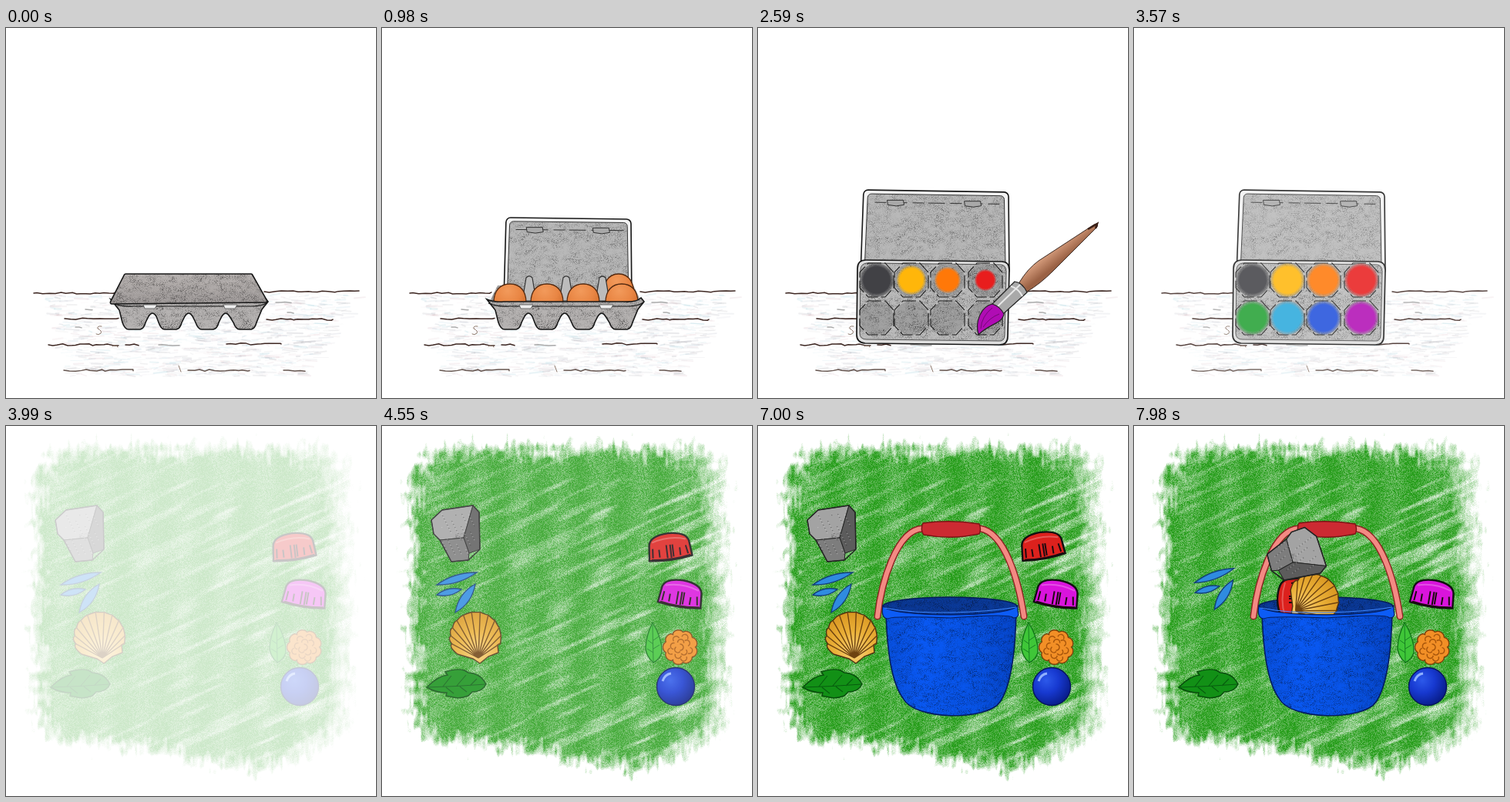
Write an HTML page with a canvas that moves like this. It is 480 by 480 pixels and loops after 8 s.

```html
<!DOCTYPE html>
<html lang="en">
<head>
<meta charset="utf-8">
<title>Eggs, paint and bucket</title>
<style>
html, body { margin: 0; width: 100%; height: 100%; overflow: hidden; background: #fff; }
canvas { display: block; width: 100vw; height: 100vh; }
</style>
</head>
<body>
<canvas id="stage" width="480" height="480"></canvas>
<script>
const SIZE = 480, LOOP = 8000, STEP = 70, INK = '#171717';
const stage = document.getElementById('stage').getContext('2d');
const layer = () => {
  const c = document.createElement('canvas');
  c.width = c.height = SIZE;
  return c.getContext('2d');
};

let seed = 7;
const rnd = (a = 1, b = 0) => {
  seed = (seed * 16807) % 2147483647;
  return b + (a - b) * seed / 2147483647;
};
const lerp = (a, b, k) => a + (b - a) * k;
const mix = (p, q, k) => p.map((v, i) => lerp(v, q[i], k));
const span = (t, a, b) => Math.min(1, Math.max(0, (t - a) / (b - a)));
const bezier = (p, k) => {
  while (p.length > 1) p = p.slice(1).map((q, i) => mix(p[i], q, k));
  return p[0];
};

// Smooth value noise
const hash = (i, j) => {
  const s = Math.sin(i * 127.1 + j * 311.7) * 43758.5453;
  return s - Math.floor(s);
};
const noise = (x, y) => {
  const i = Math.floor(x), j = Math.floor(y);
  const ease = k => k * k * (3 - 2 * k), u = ease(x - i), v = ease(y - j);
  return lerp(lerp(hash(i, j), hash(i + 1, j), u), lerp(hash(i, j + 1), hash(i + 1, j + 1), u), v);
};
// Fills a canvas with one colour; cover(x, y) gives its strength from 0 to 1
function crayon([r, g, b], cover) {
  const ctx = layer(), img = ctx.createImageData(SIZE, SIZE);
  for (let n = 0; n < SIZE * SIZE; n++) {
    img.data.set([r, g, b, 255 * cover(n % SIZE, Math.floor(n / SIZE))], n * 4);
  }
  ctx.putImageData(img, 0, 0);
  return ctx.canvas;
}

function line(g, d, color = INK, width = 1) {
  g.strokeStyle = color;
  g.lineWidth = width;
  g.stroke(d instanceof Path2D ? d : new Path2D(d));
}
function shape(g, d, fill, stroke = INK, width = 1.4, grainy = 0) {
  const p = d instanceof Path2D ? d : new Path2D(d);
  g.fillStyle = fill;
  g.fill(p);
  if (grainy) {
    g.save();
    g.clip(p);
    g.globalAlpha *= grainy;
    g.drawImage(grain, 0, 0);
    g.restore();
  }
  if (stroke) line(g, p, stroke, width);
}
function disc(x, y, rx, ry = rx) {
  const p = new Path2D();
  p.ellipse(x, y, rx, ry, 0, 0, 7);
  return p;
}
function glow(g, x, y, r, stops) {
  const c = g.createRadialGradient(x, y, 0, x, y, r);
  stops.forEach(([at, color]) => c.addColorStop(at, color));
  return c;
}

// Pencil grain shared by the shaded surfaces
const grain = crayon([0, 0, 0], (x, y) => noise(x / 7, y / 4) * rnd() ** 2 * .5);

// ---------- table ----------
const table = (() => {
  const g = layer();
  g.lineCap = 'round';
  for (let i = 0; i < 1100; i++) {
    const y = rnd(452, 346), k = (y - 346) / 106;
    const x = rnd(lerp(455, 385, k), lerp(42, 75, k));
    const tint = ['170,175,190', '150,200,215', '205,170,180', '140,140,150'][i % 4];
    line(g, `M${x} ${y}l${rnd(20, 3)} ${rnd(2, -2)}`, `rgba(${tint},${rnd(.2, .04)})`, rnd(2.4, .7));
  }
  const plank = (x, end, y, color) => {
    let d = `M${x} ${y}`;
    while (x < end) {
      x = Math.min(end, x + rnd(9, 4));
      d += `L${x} ${y + rnd(1.2, -1.2)}`;
    }
    line(g, d, color, 1.5);
  };
  [[36, 142, 344], [335, 458, 342], [76, 146, 377], [338, 424, 378], [55, 146, 411],
   [155, 172, 411], [286, 357, 410], [75, 165, 444], [236, 316, 444], [360, 388, 444]]
    .forEach(([a, b, y], i) => plank(a, b, y, i > 6 ? '#65554f' : '#3d2722'));
  [[103, 112, 365], [90, 98, 388], [198, 225, 411], [350, 370, 356], [365, 373, 369]]
    .forEach(([a, b, y]) => plank(a, b, y, '#aaa'));
  line(g, 'M124 387q-6 -1 -5 3q6 3 4 6q-3 3 -6 1M138 413q5 -3 7 1M224 438l3 8', '#8a7568', 1);
  return g.canvas;
})();

// ---------- egg carton ----------
const LID = { // outer corners: bl, tl, tr, br
  shut: [[154, 319], [134, 358], [340, 356], [319, 319]],
  open: [[158, 352], [161, 246], [323, 248], [324, 350]],
  flat: [[133, 320], [137, 210], [325, 213], [326, 320]]
};
const mixLid = (a, b, k) => a.map((p, i) => mix(p, b[i], k));

function quad(c, r) {
  const p = new Path2D(), m = mix(c[0], c[3], .5);
  p.moveTo(...m);
  c.forEach((v, i) => p.arcTo(...v, ...(c[i + 1] || m), r));
  p.closePath();
  return p;
}
function openLid(g, c) {
  const at = (u, v) => mix(mix(c[1], c[2], u), mix(c[0], c[3], u), v);
  shape(g, quad(c, 6), '#f3f3f3', INK, 1.6);
  shape(g, quad([at(.025, 1), at(.03, .045), at(.97, .045), at(.975, 1)], 5), '#b9b9b9', '#333', 1, .8);
  if (c[0][1] - c[1][1] < 60) return;
  const v = .145;
  g.setLineDash([15, 5, 22, 7]);
  line(g, `M${at(.08, v)}L${at(.95, v)}`, '#333', 1);
  g.setLineDash([]);
  [.17, .7].forEach(u => {
    const [x, y] = at(u, v);
    shape(g, `M${x - 1} ${y - 3}h21l1 6q-10 3 -21 0z`, '#a9a9a9', '#333', 1);
  });
}
function shutLid(g, c) {
  const fill = g.createLinearGradient(0, c[0][1], 0, c[1][1]);
  fill.addColorStop(0, '#bbb6b4');
  fill.addColorStop(1, '#a29d9c');
  shape(g, quad(c, 2), fill, INK, 1.6, 1);
}
const CUPS = [166, 213, 261, 310];

function frontTray(g) {
  let d = 'M136 352L143 361L147 366';
  CUPS.forEach((x, i) => {
    d += `L${x - 15} 382Q${x - 12} 391 ${x - 7} 391H${x + 8}Q${x + 13} 390 ${x + 15} 382`;
    if (i < 3) d += `L${x + 19} 374Q${x + 24} 366 ${x + 29} 374`;
  });
  shape(g, d + 'L332 365L340 355L336 350Q330 356 315 355H158Q145 356 136 352Z', '#b7b4b3', INK, 1.6, 1);
  line(g, 'M138 357Q150 362 165 361H320Q332 361 339 356', INK, 1.2);
  [178, 282].forEach(x => shape(g, `M${x} 359h18l-3 5h-13z`, '#eee', '#555', .8));
}
function egg(g, x, top, base) {
  const rx = 21, d = `M${x - rx} ${base}C${x - rx} ${top + 8} ${x - 12} ${top} ${x} ${top}` +
    `S${x + rx} ${top + 8} ${x + rx} ${base}Z`;
  shape(g, d, glow(g, x - 3, top + 9, 28, [[0, '#f29a5b'], [.6, '#e98644'], [1, '#d4702f']]), '#52280f', 1.3);
}
const BACK = [170, 217, 261, 307], FRONT = [166, 214, 261, 311];
const GONE = [630, 770, 980, 1120, 1260, 1400, 1540, 1680];

function tray(g, t) {
  shape(g, 'M150 334H326L336 354H140Z', '#b0b0b0', null, 0, 1);
  BACK.forEach((x, i) => t < GONE[i] && egg(g, x, 319, 354));
  [191, 239, 286].forEach(x =>
    shape(g, `M${x - 9} 354L${x - 4} 324Q${x} 320 ${x + 4} 324L${x + 9} 354Z`, '#bcbcbc', '#333', 1.2));
  FRONT.forEach((x, i) => t < GONE[i + 4] && egg(g, x, 332, 356));
  frontTray(g);
}

// ---------- paint box ----------
const PAINTS = ['#414145', '#ffb60a', '#ff7808', '#e81d1d', '#b00cb4', '#1f4fdc', '#28a8dc', '#22a033'];
const WELL_X = [154, 199, 246, 295];
const well = i => i < 4 ? [WELL_X[i], 327] : [WELL_X[7 - i], 376];
const brushTime = i => 2310 + i * STEP;

function paintTray(g, t) {
  shape(g, 'M129 312Q129 301 140 301L316 303Q326 303 326 314L324 400Q324 411 313 411L139 409Q128 408 128 398Z', '#dedede', INK, 1.7);
  shape(g, 'M133 314Q133 306 141 305L314 307Q322 307 322 316L320 398Q320 407 312 406L141 404Q132 404 132 396Z', '#bdbdbd', '#444', .9, 1);
  PAINTS.forEach((color, i) => {
    const [x, y] = well(i);
    shape(g, disc(x, y, 22), '#a2a2a2', null, 0, 1);
    g.setLineDash([17, 4]);
    line(g, `M${x - 11} ${y - 22}h22l11 12v20l-11 12h-22l-11 -12v-20z`, INK, 1.1);
    g.setLineDash([]);
    const age = Math.round((t - brushTime(i)) / STEP);
    if (age < 1) return;
    const r = [0, 14, 17, 19, 22][Math.min(4, age)];
    shape(g, disc(x, y, r), glow(g, x, y, r, [[0, color], [.78, color], [1, color + '30']]), null);
  });
}
function brush(g, x, y, color, alpha) {
  g.save();
  g.globalAlpha *= alpha;
  g.translate(x - 285, y - 398);
  const wood = g.createLinearGradient(355, 310, 366, 324);
  wood.addColorStop(0, '#d39a7a');
  wood.addColorStop(1, '#9a6144');
  shape(g, 'M339 330Q350 312 364 302L436 255Q442 252 440 258L383 315Q366 332 349 342Z', wood, '#3c2a22', 1);
  line(g, 'M428 261L440 254L438 260', '#3a2018', 2.5);
  shape(g, 'M304 358L333 329Q343 330 349 343L318 371Z', '#a9a9a9', '#222', 1.2);
  line(g, 'M311 361L340 333M328 335Q338 338 343 348', '#e8e8e8', 2);
  shape(g, 'M286 398C281 380 290 361 304 358Q314 361 319 371C317 384 299 384 286 398Z', color, '#222', 1.2);
  line(g, 'M289 390Q290 374 304 363M292 388Q300 376 313 371', 'rgba(0,0,0,.35)', 1);
  g.restore();
}
function drawBrush(g, t) {
  if (t < 2240 || t >= 3290) return;
  if (t < 2310) return brush(g, 314, 338, PAINTS[0], .6);
  const i = Math.min(7, Math.floor((t - 2310) / STEP));
  const [x, y] = well(i), out = span(t, 2800, 3220);
  brush(g, lerp(x - 10, 27, out), lerp(y + 22, 306, out), PAINTS[i], 1 - span(t, 3010, 3290));
}

function kitchen(g, t) {
  g.drawImage(table, 0, 0);
  const open = t < 70 ? 0 : Math.min(1, (t / STEP) / 5);
  const tilt = t < 2100 ? 0 : Math.min(1, (t - 2030) / 280);
  if (open < .4) {
    if (open) tray(g, t); else frontTray(g);
    shutLid(g, mixLid(LID.shut, LID.open, open));
    return;
  }
  openLid(g, tilt ? mixLid(LID.open, LID.flat, tilt) : mixLid(LID.shut, LID.open, open));
  if (tilt < .5) tray(g, t);
  else {
    const top = lerp(350, 301, tilt), bottom = lerp(392, 411, tilt);
    g.save();
    g.translate(0, top);
    g.scale(1, (bottom - top) / 110);
    g.translate(0, -301);
    paintTray(g, t);
    g.restore();
  }
  drawBrush(g, t);
}

// ---------- lawn ----------
// Vertical bands crossed by pale slanted streaks, with a ragged rim
const lawn = crayon([38, 157, 26], (x, y) => {
  const bottom = 412 + 28 * Math.exp(-(((x - 305) / 85) ** 2));
  const u = (x - 241) / 201, v = (y - (bottom + 30) / 2) / ((bottom - 30) / 2);
  const depth = (1 - (u ** 8 + v ** 8) ** .125) * 200;
  const rag = (noise(x / 9, y / 9) - .5) * 20 + (noise(x / 3, y / 12) - .5) * 16;
  const rim = span(depth + rag, -9, 12 + 26 * span(x, 360, 440));
  const streak = noise((x * .92 - y * -.4) / 34 + 9, (x * .4 + y * .92) / 6);
  const band = .07 * Math.cos((x - 150) * Math.PI * 2 / 53);
  const strength = .87 + band - span(streak, .5, .95) * lerp(.15, .6, x / SIZE);
  const bite = (rnd() - .5) * .45;
  return rim ? span(rim * strength + bite * Math.sqrt(rim), 0, 1) : 0;
});

const blade = (x, y, X, Y, w) => {
  const n = Math.hypot(X - x, Y - y), mx = (x + X) / 2, my = (y + Y) / 2;
  const dx = (Y - y) / n * w, dy = (x - X) / n * w;
  return `M${x} ${y}Q${mx + dx} ${my + dy} ${X} ${Y}Q${mx - dx} ${my - dy} ${x} ${y}Z`;
};

// Things to collect, drawn around their own centre
function stone(g) {
  shape(g, 'M-31 -17L-17 -30L23 -36L11 6L-20 9L-28 1Z', '#a3a3a3', '#333', 1, 1);
  shape(g, 'M23 -36L31 -27L32 21L18 26L11 6Z', '#5c5c5c', '#222', 1);
  shape(g, 'M-20 9L11 6L18 26L17 35L-5 37Z', '#7d7d7d', '#222', 1);
  for (let i = 0; i < 90; i++) {
    const x = -18 + (i * 37 % 43), y = -25 + (i * 23 % 53);
    g.fillStyle = i % 2 ? 'rgba(30,30,30,.35)' : 'rgba(235,235,235,.3)';
    g.fillRect(x, y, 1.4, 1.2);
  }
  line(g, 'M-31 -17L-17 -30L23 -36L31 -27L32 21L17 35L-5 37L-20 9L-28 1Z', '#222', 1.5);
}
function shell(g) {
  let d = 'M-4 28L-24 22', ribs = '';
  for (let i = 0; i <= 11; i++) {
    const a = -3.35 + i * .322, r = 32 + 3 * Math.sin(i * .29);
    const x = r * Math.cos(a), y = r * Math.sin(a) + 2;
    d += `Q${x * 1.08 - 2} ${y * 1.08 + 3} ${x} ${y}`;
    ribs += `M3 27L${x} ${y}`;
  }
  shape(g, d + 'L28 10L29 20L16 25L5 34Z', glow(g, 3, 18, 52, [[0, '#f8d27a'], [.5, '#eab038'], [1, '#d8951f']]), '#4b3010', 1.4);
  line(g, ribs, '#6d4210', 1.4);
}
function cap(color) {
  return g => {
    shape(g, 'M-28 15L-26 -5Q-24 -17 0 -18Q24 -17 26 -5L28 14Q0 19 -28 15Z', color, '#111', 2.4);
    line(g, 'M-22 0l-1 12M-14 2v10M-4 -3v17M1 -3v17M4 -3v16M13 2v10M21 0l2 11M-25 14Q0 18 26 13', '#1d0a10', 2);
    line(g, 'M-22 -8Q0 -15 22 -8', 'rgba(255,255,255,.25)', 2);
  };
}
function petals(g) {
  [[-26, -10, 26, -26, 9], [-26, 3, 6, -4, 8], [-2, 26, 24, -11, 11]].forEach(p =>
    shape(g, blade(...p), '#2f8be0', '#123f78', 1.4));
}
function leaf(g) {
  shape(g, 'M-39 5Q-24 -10 -12 -11L-15 -15Q0 -20 10 -17L15 -14Q31 -13 38 1Q33 11 20 11L15 16Q4 20 -4 18L-14 16L-13 12Q-28 12 -39 5Z', '#129016', '#084d0c', 1.5);
  line(g, 'M-39 5Q0 4 37 1M-18 4L-7 -10M0 3L12 -11M17 3L26 -6M-14 5L-4 13M4 4L13 11', '#075c0e', 1.1);
}
function sprout(g) {
  shape(g, 'M-1 -31Q12 -10 11 8Q8 17 0 21Q-10 12 -10 1Q-9 -15 -1 -31Z', '#3fc638', '#13761a', 1.4);
  line(g, 'M-1 -28L0 20M0 -8l7 -5M0 3l8 -5M0 -3l-7 -5M0 8l-8 -5', '#168022', 1);
}
function flower(g) {
  const p = new Path2D();
  for (let i = 0; i <= 120; i++) {
    const a = i / 120 * Math.PI * 2, r = 19 + 3.5 * Math.sqrt(Math.abs(Math.sin(a * 4.5)));
    p.lineTo(r * Math.cos(a), r * Math.sin(a));
  }
  shape(g, p, '#f28f26', '#7b410a', 1.4);
  for (let i = 0; i < 12; i++) {
    const a = i * 2.4, r = 4.4 * Math.sqrt(i), curl = new Path2D();
    curl.arc(r * Math.cos(a), r * Math.sin(a), 4, a - 1.7, a + 1.7);
    line(g, curl, '#a8560c', 1.5);
  }
}
function ball(g) {
  shape(g, disc(0, 0, 24.5), glow(g, -7, -8, 36, [[0, '#2c59ea'], [.45, '#1739d0'], [1, '#071a82']]), '#06145c', 1.4);
  line(g, 'M-17 -7Q-14 -16 -6 -17', '#8fb0ff', 3);
}

// Flights have a start, an end, control points and a spin
const ITEMS = [
  { draw: cap('#dc211d'), at: [373, 157], turn: -.12, from: 6960, to: 7700, via: [[320, 140], [215, 110], [204, 225]], spin: -1.45 },
  { draw: shell, at: [122, 274], turn: 0, from: 7490, to: 7980, via: [[125, 190], [190, 180], [233, 226]], spin: 1.15 },
  { draw: stone, at: [95, 139], turn: 0, from: 7420, to: 7980, via: [[140, 110], [200, 110], [210, 165]], spin: 1.4 },
  { draw: petals, at: [97, 216], turn: 0, from: 7840, to: 7980, via: [[105, 212]], spin: -.05 },
  { draw: leaf, at: [97, 334], turn: 0 },
  { draw: cap('#d914dc'), at: [388, 218], turn: .17 },
  { draw: sprout, at: [352, 286], turn: 0 },
  { draw: flower, at: [387, 287], turn: 0 },
  { draw: ball, at: [381, 338], turn: 0 }
];
function drawItem(g, { draw, at, turn, from, to, via, spin }, t) {
  const k = via ? span(t, from, to) ** 1.25 : 0;
  g.save();
  g.translate(...(k ? bezier([at, ...via], k) : at));
  g.rotate(turn + (k ? spin * k : 0));
  draw(g);
  g.restore();
}

// ---------- bucket ----------
function bucketBack(g) {
  const arms = 'M155 247C160 203 180 134 214 133M288 133C320 138 338 200 345 247';
  g.lineCap = 'round';
  line(g, arms, '#8c2422', 9);
  line(g, arms, '#f38a83', 6.2);
  shape(g, 'M214 126Q250 121 287 127Q290 134 287 140Q250 148 215 141Q210 135 214 126Z', '#cc2a32', '#7a1414', 1.4);
  g.lineCap = 'butt';
  shape(g, disc(249, 234, 87, 12), '#0b3a9a', '#051c55', 1.5, 1);
}
function bucketFront(g) {
  const fill = g.createLinearGradient(165, 0, 334, 0);
  fill.addColorStop(0, '#0850e0');
  fill.addColorStop(.3, '#0a5af6');
  fill.addColorStop(.7, '#0854e8');
  fill.addColorStop(1, '#0646cc');
  shape(g, 'M166 240C167 282 171 330 188 353C202 382 297 383 314 358C329 336 334 290 335 240Q250 250 166 240Z', fill, '#041c5c', 1.6, 1.5);
  shape(g, 'M162 233C166 241 205 245 249 245S332 241 337 233V240Q340 249 331 249Q329 243 250 249Q172 246 169 250Q159 250 162 233Z', '#0c5cf6', '#041c5c', 1.2);
  line(g, 'M164 236Q200 243 250 242T335 235', '#3d86ff', 1);
}
const DROP = [-110, -45, 14, 0];

function garden(g, t) {
  g.drawImage(lawn, 0, 0);
  ITEMS.forEach(o => !(o.via && t > o.from) && drawItem(g, o, t));
  if (t < 4900) return;
  g.save();
  g.translate(0, DROP[Math.min(3, Math.floor((t - 4900) / STEP))]);
  bucketBack(g);
  ITEMS.forEach(o => o.via && t > o.from && drawItem(g, o, t));
  bucketFront(g);
  g.restore();
}

// ---------- playback ----------
const scratch = layer();
function show(scene, t, alpha) {
  if (alpha <= 0) return;
  scratch.clearRect(0, 0, SIZE, SIZE);
  scene(scratch, t);
  stage.globalAlpha = alpha;
  stage.drawImage(scratch.canvas, 0, 0);
  stage.globalAlpha = 1;
}
let shown = -1;
function tick() {
  const t = Math.floor(performance.now() % LOOP / STEP) * STEP;
  if (t !== shown) {
    shown = t;
    stage.fillStyle = '#fff';
    stage.fillRect(0, 0, SIZE, SIZE);
    show(kitchen, t, 1 - span(t, 3500, 3990));
    show(garden, t, span(t, 3780, 4690));
  }
  requestAnimationFrame(tick);
}
tick();
</script>
</body>
</html>
```
